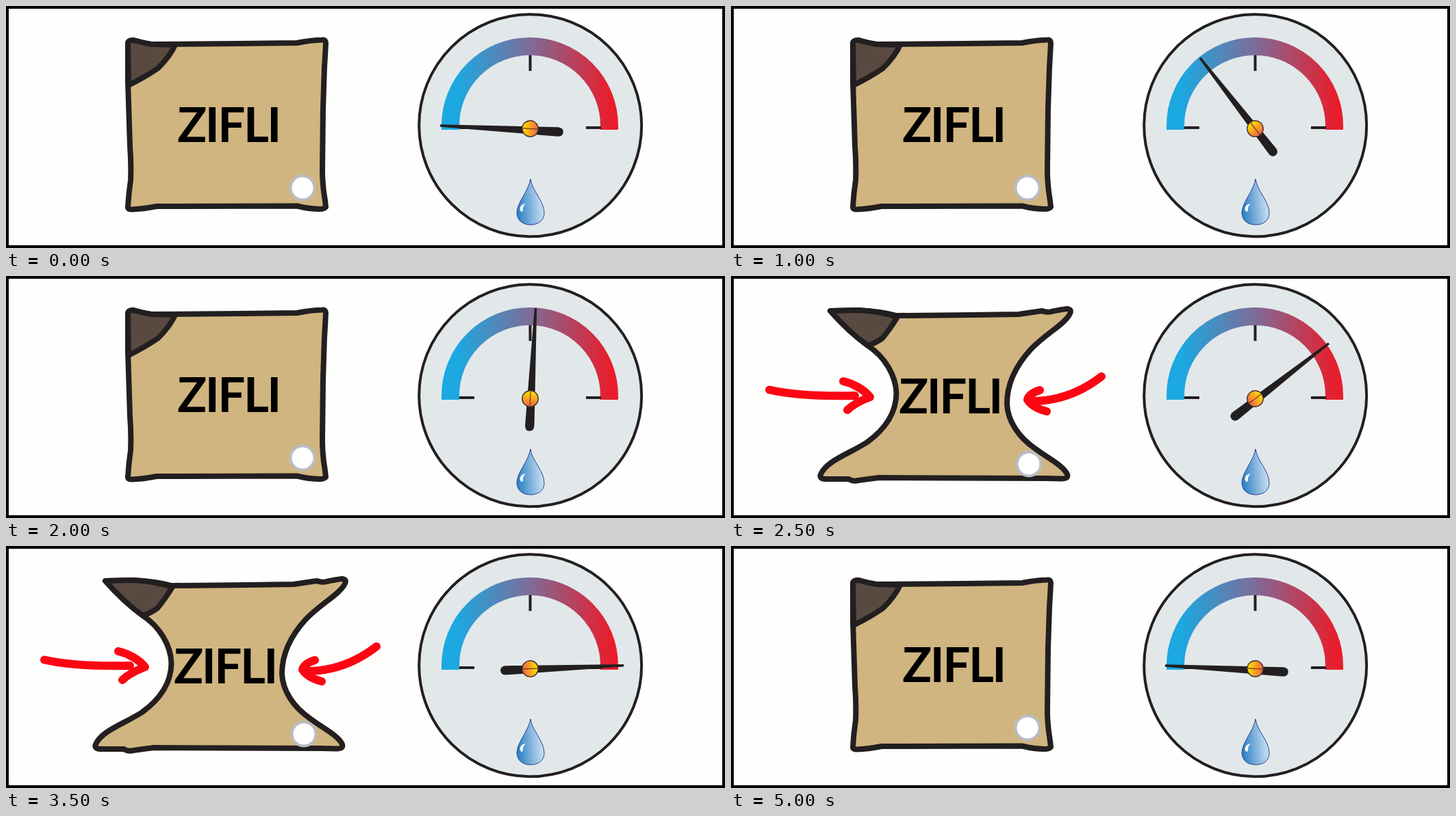
Animation of 1050 by 354 pixels, one loop 5500 ms. Source, as an HTML page:

```html
<!DOCTYPE html>
<html lang="en">
<head>
<meta charset="utf-8">
<title>Cushion and gauge</title>
<style>
  html, body { margin: 0; width: 100%; height: 100%; overflow: hidden; background: #fefefc; }
  svg { display: block; width: 100%; height: 100%; }
  text { font: 700 71px Lato, sans-serif; letter-spacing: -2.5px; text-anchor: middle; }
  .ink { stroke: #231f20; stroke-width: 8; stroke-linejoin: round; stroke-linecap: round; }
  .cloth { fill: #d0b580; }
  .flap { fill: #594a41; }
  .button { fill: #fff; stroke: #b9bdc3; stroke-width: 4; }
  .arrow { fill: none; stroke: #fb0612; stroke-width: 12; stroke-linecap: round; stroke-linejoin: round; }
  .tick { stroke: #231f20; stroke-width: 4; }
</style>
</head>
<body>
<svg viewBox="0 0 1050 354">
  <defs>
    <linearGradient id="scale" gradientUnits="userSpaceOnUse" x1="636" x2="894" y1="0" y2="0">
      <stop offset=".09" stop-color="#1ca8e1"/>
      <stop offset=".5" stop-color="#7d6c98"/>
      <stop offset=".96" stop-color="#e91d2b"/>
    </linearGradient>
    <linearGradient id="water" x1="0" y1=".65" x2="1" y2=".5">
      <stop offset=".05" stop-color="#2f84c5"/>
      <stop offset=".5" stop-color="#7fb2dc"/>
      <stop offset="1" stop-color="#d3e4f3"/>
    </linearGradient>
    <linearGradient id="hub">
      <stop offset=".1" stop-color="#ffd800"/>
      <stop offset=".9" stop-color="#f2703f"/>
    </linearGradient>
  </defs>
  <rect x="2" y="2" width="1046" height="350" fill="#fefefc" stroke="#000" stroke-width="4"/>

  <g id="relaxed">
    <path class="ink cloth" d="M178 54Q179 50 186 50Q200 54 212 56L340 55L425 54Q445 50 462 49.500Q467 49 467 54Q466 74 465 90L463 150L462 240Q462 262 466 285L467 294Q465 297 458 297Q443 297 425 292.500L220 293Q200 297 184 297.500Q178 298 178 294Q179 275 182 255Q183 230 181 205L178 110Z"/>
    <path class="ink flap" d="M178 54Q179 50 186 50Q200 54 212 56L247 57Q240 73 222 91Q203 104 179 116Z"/>
    <circle class="button" cx="433" cy="266" r="17.500"/>
    <text x="325" y="199">ZIFLI</text>
  </g>

  <g id="squeezed">
    <path class="ink cloth" d="M145 51L186 50Q220 52 242 58L350 57L420 56Q440 53 454 51Q461 54 468 52Q482 49 491 48Q499 49 494 57C485 72 460 84 438 107C416 131 403 159 403 187C404 212 420 236 445 253C462 266 485 277 491 290Q493 297 482 296.500L460 296L216 295Q200 297 186 299Q178 301 172 297L140 297Q128 297 131 290C140 270 171 261 199 243C225 224 241 200 241.500 172C241 145 224 118 200 102Q171 81 145 51Z"/>
    <path class="ink flap" d="M145 51L186 50Q220 52 243 60Q232 78 221 91Q213 97 200 102Q171 81 145 51Z"/>
    <circle class="button" cx="435" cy="275" r="17.500"/>
    <text x="320" y="201">ZIFLI</text>
    <path class="arrow" d="M56 166.500C90 174 140 176 181 175M164 154C178 157 194 166 203 177C190 182 178 188 170 196"/>
    <path class="arrow" d="M541 147C510 171 475 184 436 183M451 167Q435 172 433 181Q441 193 461 198"/>
  </g>

  <circle cx="765.700" cy="174.700" r="162.500" fill="#e2e8ea" stroke="#231f20" stroke-width="4"/>
  <path d="M649 181V175A116 116 0 0 1 881 175V181" fill="none" stroke="url(#scale)" stroke-width="26"/>
  <path class="tick" d="M765.500 72V95M662 178H684M847 178H869"/>
  <path d="M766 253C768 270 786 285 786 303C786 314 777 320 766 320C755 320 746 314 746 302C747 286 763 271 766 253Z" fill="url(#water)" stroke="#2b3f93"/>
  <path d="M759 289Q751 290 750.500 297L752 301L755 300Q754 293 759 289Z" fill="#fff"/>

  <path id="needle" d="M0-1.700L172-6.700Q180-6.500 180 0Q180 6.500 172 6.700L0 1.700Z" fill="#231f20"/>
  <g id="cap">
    <circle r="11.700" fill="url(#hub)" stroke="#4a3030" stroke-width="1.500"/>
    <path d="M-11 0H11" stroke="#6b3a22" stroke-width="1.300"/>
  </g>
</svg>
<script>
  const STEP = 500;
  // Needle per step: tip x, tip y, degrees clockwise from pointing left
  const poses = [
    [634, 175, 3], [720, 58, 70], [685, 76, 52.2], [799, 53, 104.5],
    [773.5, 47, 92.9], [873, 98.5, 142.1], [836, 69, 121.5], [902, 174.7, 177.6],
    [855, 80, 131.2], [702, 64, 61.5], [634, 175, 3]
  ];
  const el = id => document.getElementById(id);
  const show = (id, on) => el(id).setAttribute('visibility', on ? 'visible' : 'hidden');

  function draw(now) {
    const step = Math.floor(now / STEP) % poses.length;
    const [x, y, angle] = poses[step];
    const pressed = step < 8 && step % 2 === 1;
    show('squeezed', pressed);
    show('relaxed', !pressed);
    el('needle').setAttribute('transform', `translate(${x} ${y}) rotate(${angle})`);
    el('cap').setAttribute('transform', `translate(765.5 179.5) rotate(${angle})`);
  }

  const start = performance.now();
  function tick() {
    draw(performance.now() - start);
    requestAnimationFrame(tick);
  }
  tick();
</script>
</body>
</html>
```
